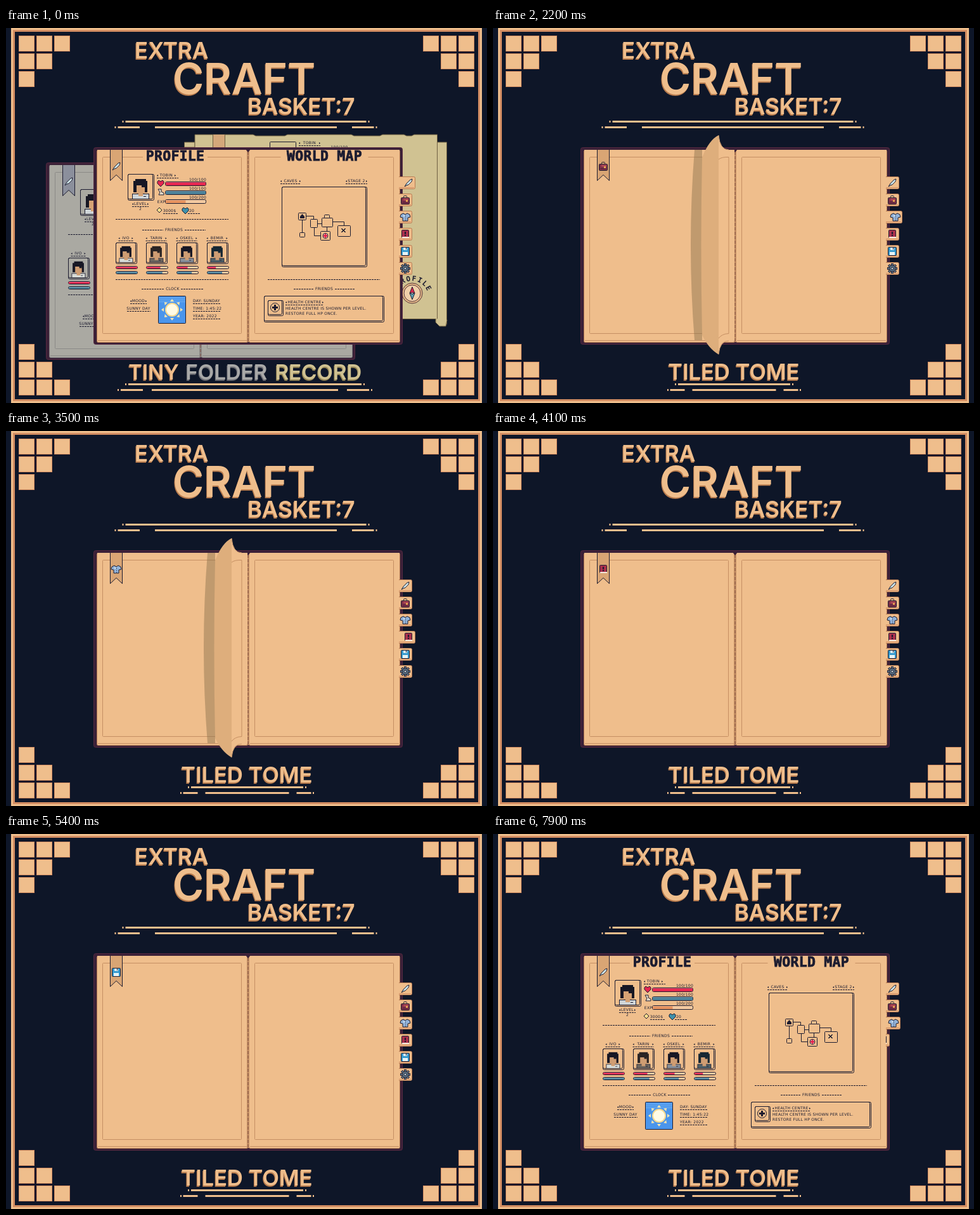
These frames come from a looping animation (759x591 px, 8000 ms). An HTML page with a canvas:

```html
<!DOCTYPE html>
<html lang="en">
<head>
<meta charset="utf-8">
<title>Tiled Tome</title>
<style>
html, body { margin: 0; width: 100%; height: 100%; overflow: hidden; background: #0e1628; }
canvas { display: block; }
</style>
</head>
<body>
<canvas id="stage" width="759" height="591"></canvas>
<script>
const ctx = document.getElementById('stage').getContext('2d');
const NAVY = '#0e1628', PEACH = '#efbe8c', ORANGE = '#d38d62', INK = '#1c1c30';
const RED = '#e5264f', BLUE = '#4b8199', TAN = '#deae7c', KHAKI = '#d0c292';
const WARM = { paper: PEACH, line: '#c58f63', edge: '#a8714f', ribbon: '#d9a574' };
const GREY = { paper: '#aaa9a2', line: '#8b8a87', edge: '#77767a', ribbon: '#8b8f9c' };
const TITLE = 'Inter, sans-serif', MONO = '"DejaVu Sans Mono", monospace';

function rect(color, x, y, w, h) {
  ctx.fillStyle = color;
  ctx.fillRect(x, y, w, h);
}
function box(x, y, w, h, fill, stroke = INK, radius = 1) {
  ctx.beginPath();
  ctx.roundRect(x + .5, y + .5, w - 1, h - 1, radius);
  paint(fill, stroke);
}
// Frame with a heavier right and bottom side
function panel(x, y, w, h) {
  box(x, y, w, h, null, INK, 2);
  box(x, y, w - 2, h - 2, null, INK, 2);
}
function paint(fill, stroke) {
  if (fill) { ctx.fillStyle = fill; ctx.fill(); }
  if (stroke) { ctx.strokeStyle = stroke; ctx.lineWidth = 1; ctx.stroke(); }
}
function path(d, fill, stroke) {
  const p = new Path2D(d);
  if (fill) { ctx.fillStyle = fill; ctx.fill(p); }
  if (stroke) { ctx.strokeStyle = stroke; ctx.lineWidth = 1; ctx.stroke(p); }
}
function circle(x, y, r, fill, stroke) {
  ctx.beginPath();
  ctx.arc(x, y, r, 0, 7);
  paint(fill, stroke);
}
function at(x, y, draw) {
  ctx.save();
  ctx.translate(x, y);
  draw();
  ctx.restore();
}
function dashes(x1, x2, y) {
  ctx.setLineDash([3, 1]);
  path(`M${x1} ${y + .5}H${x2}`, null, INK);
  ctx.setLineDash([]);
}
function text(str, x, y, align = 'center', font = '6px "DejaVu Sans", sans-serif') {
  ctx.font = font;
  ctx.letterSpacing = '0.3px';
  ctx.textAlign = align;
  ctx.textBaseline = 'middle';
  ctx.fillStyle = INK;
  ctx.fillText(str, x, y + .5);
  ctx.letterSpacing = '0px';
}
function pageTitle(str, x, half, theme) {
  rect(theme.paper, x - half, 198, 2 * half, 11);
  text(str, x, 203, 'center', `bold 21.5px ${MONO}`);
  ctx.strokeStyle = INK;
  ctx.lineWidth = .8;
  ctx.letterSpacing = '0.3px';
  ctx.strokeText(str, x, 203.5);
  ctx.letterSpacing = '0px';
}
function label(str, x, y, half) {
  text(str, x, y);
  path(`M${x - half} ${y + .5}l2-1.5v3ZM${x + half} ${y + .5}l-2-1.5v3Z`, INK);
  dashes(x - half, x + half, y + 4);
}
function heading(str, x, y, half, reach) {
  text(str, x, y);
  dashes(x - reach, x - half, y);
  dashes(x + half, x + reach, y);
}

// Decorative frame and lettering
function lettering(str, x, baseline, size, align = 'left', color = PEACH, shade = '#b87b4d') {
  ctx.font = `600 ${size}px ${TITLE}`;
  ctx.textAlign = align;
  ctx.textBaseline = 'alphabetic';
  ctx.fillStyle = shade;
  ctx.fillText(str, x - 1, baseline + 1);
  ctx.fillStyle = color;
  ctx.fillText(str, x, baseline - 1);
}
function rules(center, y, half, gap, inner, tail) {
  const bar = (a, b, top) => rect(PEACH, center + a, top, b - a, 3);
  bar(-half, half, y);
  for (const s of [-1, 1]) {
    rect(PEACH, center + s * (half + 4) - 1, y, 2, 3);
    rect(PEACH, center + s * (half + 16) - 1, y + 9, 2, 3);
    bar(Math.min(s * (inner + gap), s * tail), Math.max(s * (inner + gap), s * tail), y + 9);
  }
  bar(-inner, inner, y + 9);
}
function backdrop() {
  rect(NAVY, 0, 0, 759, 591);
  ctx.lineWidth = 3;
  ctx.strokeStyle = PEACH;
  ctx.strokeRect(9.5, 1.5, 740, 588);
  ctx.strokeStyle = ORANGE;
  ctx.strokeRect(12.5, 4.5, 734, 582);
  for (let row = 0; row < 3; row++)
    for (let col = 0; col < 3 - row; col++)
      for (const x of [20 + 28 * col, 714 - 28 * col])
        for (const y of [12 + 28 * row, 554 - 28 * row]) {
          rect(ORANGE, x, y, 25, 25);
          rect(PEACH, x + 1, y + 1, 23, 23);
        }
  lettering('EXTRA', 203, 49, 35);
  lettering('CRAFT', 263, 105, 67);
  lettering('BASKET:7', 381, 137, 35);
  rules(378.5, 146, 190, 24, 143.5, 202);
}

// Icons, each centred on the origin
const icons = [
  function feather() {
    path('M-6 6L-3 1L3-5L6-6L5-2L0 3L-3 4Z', '#e4f2f2', INK);
    path('M-4 4L4-4', null, '#8fb5c0');
  },
  function backpack() {
    box(-3, -7, 6, 4, null, INK);
    box(-7, -4, 14, 11, '#7d2f48');
    rect('#a64452', -3, -3, 8, 4);
    rect('#e8a052', 1, 0, 3, 3);
    rect('#4a2138', -5, 3, 9, 1);
  },
  function shirt() {
    path('M-3-6L-7-4L-8 0L-4 1V6H4V1L8 0L7-4L3-6L0-4Z', '#92b3d9', INK);
    rect('#d6e5f2', -3, -3, 2, 2);
    for (const y of [-2, 1, 4]) rect(INK, 0, y, 1, 1);
  },
  function book() {
    box(-6, -7, 12, 13, '#a9304c');
    rect('#f2e6dc', -5, 4, 11, 2);
    rect(INK, -1, -4, 2, 4);
    rect(INK, -1, 1, 2, 2);
  },
  function disk() {
    box(-7, -7, 14, 14, '#369ace');
    rect('#d9eef5', -3, -6, 6, 4);
    rect(INK, 1, -6, 1, 3);
    rect('#e7f3f5', -4, 1, 8, 5);
  },
  function gear() {
    for (let i = 0; i < 8; i++) {
      ctx.rotate(Math.PI / 4);
      rect(INK, -2, -8, 4, 5);
      rect('#7890a0', -1, -7, 2, 4);
    }
    circle(0, 0, 5, '#5c7486', INK);
    circle(0, 0, 2, '#c4ced2', INK);
  }
];

function heart(x, y, color) {
  at(x, y, () => path('M0 5L-5 0V-3L-3-5L0-3L3-5L5-3V0Z', color, INK));
}
function bar(x, y, w, h, color, amount) {
  box(x, y, w, h, '#f3c9a0', INK, 2);
  rect(color, x + 1, y + 1, (w - 2) * amount, h - 2);
  rect('#ffffff44', x + 2, y + 1, (w - 4) * amount, 1);
}
function portrait(x, y, size, hair, skin, shirt) {
  panel(x, y, size, size);
  at(x + size / 2 - 1, y + size - 3, () => {
    const s = size / 42;
    ctx.scale(s, s);
    rect(hair, -8, -31, 17, 4);
    rect(hair, -11, -28, 22, 18);
    rect(skin, -6, -21, 13, 13);
    rect(hair, 2, -22, 5, 4);
    rect(INK, -13, -8, 27, 8);
    rect(shirt, -12, -7, 25, 7);
    rect(skin, -3, -9, 7, 5);
    rect(INK, 5, -4, 4, 1);
  });
}

function profilePage(theme) {
  pageTitle('PROFILE', 267, 51, theme);
  portrait(192, 230, 42, '#171724', '#d6a274', '#cfd5d8');
  label('LEVEL', 212, 277, 13);
  text('2', 212, 285);
  label('TOBIN', 253, 232, 15);
  dashes(238, 272, 236);
  heart(244, 245, RED);
  path('M240 254H245V258L249 260V263H241L243 259Z', '#e8ddca', INK);
  text('EXP', 245, 274);
  bar(251, 242, 65, 7, RED, 1);
  bar(251, 256, 65, 7, BLUE, 1);
  bar(251, 270, 65, 7, '#e7935f', .5);
  ['100/100', '100/100', '100/200'].forEach((s, i) => text(s, 316, 239 + 14 * i, 'right'));
  path('M242 283L246 287L242 291L238 287Z', '#ffdc8c', INK);
  text('3000$', 258, 288);
  dashes(248, 271, 292);
  heart(283, 288, '#3f91ab');
  text('20', 293, 288);
  dashes(287, 306, 292);
  dashes(173, 351, 301);
  heading('FRIENDS', 265, 318, 17, 50);
  const friends = [
    ['IVO', '#171724', '#d9ddd9', 1, 1], ['TARIN', '#2a2424', '#6e665f', .65, .75],
    ['OSKEL', '#171724', '#8a919b', .5, .7], ['BEMIR', '#162733', '#4f6068', .4, .7]
  ];
  friends.forEach(([name, hair, shirt, health, energy], i) => {
    const x = 173 + 48 * i;
    label(name, x + 16, 331, name.length * 2.5 + 4);
    portrait(x, 338, 34, hair, '#cf9d73', shirt);
    bar(x, 375, 35, 5, RED, health);
    bar(x, 383, 35, 5, BLUE, energy);
  });
  dashes(173, 351, 396);
  heading('CLOCK', 263, 411, 13, 49);
  label('MOOD', 209, 430, 13);
  text('SUNNY DAY', 209, 442);
  dashes(191, 228, 446);
  box(240, 422, 44, 44, '#4a95ec');
  for (const y of [425, 428, 431]) rect('#6fb0f2', 241, y, 42, 1);
  at(262, 444, () => {
    for (let i = 0; i < 8; i++) {
      ctx.rotate(Math.PI / 4);
      path('M-3-13L0-17L3-13Z', '#fbe7b0');
    }
    circle(0, 0, 11, '#f6d990');
    circle(0, 0, 9, '#fffbe6');
  });
  ['DAY: SUNDAY', 'TIME: 1:45:22', 'YEAR: 2022'].forEach((s, i) => {
    text(s, 295, 430 + 12 * i, 'left');
    dashes(295, 338, 434 + 12 * i);
  });
}

function mapPage(theme) {
  pageTitle('WORLD MAP', 502.5, 69, theme);
  label('CAVES', 449, 241, 16);
  label('STAGE 2', 553, 241, 17);
  panel(435, 250, 135, 127);
  path('M474 296.5H485.5V301M467.5 303V322M492 308.5H498M515 305.5H533.5V311M486.5 314V327.5H496M506.5 313V320', null, INK);
  [[461, 291, 13, 12], [480, 301, 12, 14], [498, 299, 18, 15], [502, 294, 9, 6],
   [523, 311, 21, 18], [496, 320, 16, 15], [463, 322, 9, 8]]
    .forEach(r => box(...r, theme.paper));
  path('M464 297L467.5 293L471 297V300H464Z', INK);
  path('M529 316L535 322M535 316L529 322M530 316L536 322M536 316L530 322', null, INK);
  circle(504, 327.5, 4, '#f5d9c7', INK);
  rect(RED, 503, 324, 2, 7);
  rect(RED, 501, 326, 6, 3);
  dashes(413, 590, 396);
  heading('FRIENDS', 502, 411, 17, 48);
  panel(407, 422, 190, 42);
  panel(413, 429, 25, 25);
  circle(424.5, 440.5, 7, null, INK);
  rect(INK, 423, 436, 3, 9);
  rect(INK, 420, 439, 9, 3);
  label('HEALTH CENTRE', 471, 432, 30);
  text('HEALTH CENTRE IS SHOWN PER LEVEL.', 441, 442, 'left');
  text('RESTORE FULL HP ONCE.', 441, 450, 'left');
}

function bookmark(theme, icon, length = 1) {
  ctx.save();
  ctx.beginPath();
  ctx.rect(160, 192, 30, 50);
  ctx.clip();
  ctx.translate(0, -50 * (1 - length));
  path('M164.5 191V240.5L174 231.5L183.5 240.5V191Z', theme.ribbon, INK);
  at(174, 218, icons[icon]);
  ctx.restore();
}
function book(theme) {
  box(138, 188, 488, 311, '#3a2037', '#562840', 3);
  for (const x of [143, 383]) {
    box(x, 192, 239, 304, theme.paper, theme.edge, 2);
    rect(theme.paper, x + 1, 192, 237, 2);
    rect(theme.line, x + 2, 492, 235, 1);
    box(x + 9, 203, 220, 279, null, theme.line);
  }
  rect(theme.line, 380, 194, 4, 301);
  ctx.setLineDash([5, 2]);
  path('M382 195V495', null, '#805044');
  ctx.setLineDash([]);
  path('M378 191H386L382 196Z', '#3a2037');
}
function profileSpread(theme) {
  book(theme);
  profilePage(theme);
  mapPage(theme);
  bookmark(theme, 0);
}
function tabs(offsetOf) {
  ctx.save();
  ctx.beginPath();
  ctx.rect(620, 225, 60, 170);
  ctx.clip();
  icons.forEach((icon, i) => {
    const dx = offsetOf(i);
    if (dx === null) return;
    const y = 244 + 27 * i;
    box(610, y - 10, 31 + dx, 20, PEACH, '#b77b52', 2);
    rect(ORANGE, 620, y + 7, 19 + dx, 1);
    at(630 + dx, y, icon);
  });
  ctx.restore();
}

// Turning page: it rises from the spine to a ridge, its back falls to the free edge
function turningPage(ridge, free, rise) {
  const top = 192 - rise, bottom = 493 + rise * .93;
  path(`M${free} 192H${free - 12}Q${free - 24} 342 ${free - 12} 492H${free}Z`, '#8a6f4c77');
  path(`M${ridge} ${top}Q${ridge + 2} 192 ${ridge + 16} 192H381V493H${ridge + 16}Q${ridge + 2} 493 ${ridge} ${bottom}Z`, PEACH);
  path(`M${ridge} ${top}Q${ridge + 2} 192 ${ridge + 16} 192M${ridge + 16} 493Q${ridge + 2} 493 ${ridge} ${bottom}`, null, '#c9986b');
  path(`M${ridge} 207Q${ridge + 5} 203 372 203.5V481.5Q${ridge + 5} 482 ${ridge} 489`, null, WARM.line);
  path(`M${ridge} ${top}Q${free + 11} ${top + 7} ${free} 204Q${free - 3} 342 ${free} 484Q${free + 11} ${bottom - 8} ${ridge} ${bottom}Z`, TAN);
}
function cornerCurl() {
  path('M145 426Q142 490 204 492H190Q158 492 145 462Z', '#b9935f');
  path('M145 409Q155 441 192 438Q194 482 237 492Q194 493 172 483Q147 468 145 409Z', TAN);
  path('M145 409Q155 441 192 438Q194 482 237 492', null, '#d3a474');
}
function pageTurn(step) {
  if (step === 1) at(764, 0, () => { ctx.scale(-1, 1); cornerCurl(); });
  if (step === 2) turningPage(452, 410, 20);
  if (step === 3) turningPage(356, 330, 23);
  if (step === 4) turningPage(266, 224, 20);
  if (step === 5) turningPage(190, 160, 9);
  if (step === 6) cornerCurl();
}

// Opening composition: parchment, grey book and main book
function parchment() {
  const edge = '#6f6042';
  path('M281.5 188V180H298V188Z', KHAKI, edge);
  path('M660 180H695.5V467L690 470L680 464V458H660Z', KHAKI, edge);
  path('M298 200V168H390L394 170H440L444 168H545L549 170H590L594 168H628L632 170H640L644 168H680.5V458.5H600V200Z', KHAKI, edge);
  path('M678 458V464L684 470H694L696 460', KHAKI, edge);
  rect('#d4a77a', 327, 168, 18, 22);
  path('M326.5 168V190M345.5 168V190', null, edge);
  box(416, 179, 42, 20, null);
  label('TOBIN', 479, 181, 17);
  text('100/100', 526, 188);
  circle(641, 418, 16, '#e8bd8b', '#533137');
  circle(641, 418, 13, '#f0cfaa', '#533137');
  path('M641 408L645 418H637Z', RED, INK);
  path('M641 428L645 418H637Z', '#5e9fb0', INK);
  circle(641, 418, 1.5, '#f4eee0', INK);
  [...'PROFILE'].forEach((ch, i) => at(641, 424, () => {
    ctx.rotate(-.85 + .32 * i);
    text(ch, 0, -29, 'center', `bold 11px ${MONO}`);
  }));
}
function opening() {
  parchment();
  at(-75, 24, () => profileSpread(GREY));
  profileSpread(WARM);
  tabs(i => i === 0 ? 5 : 0);
  lettering('TINY', 233, 555, 33, 'center');
  lettering('FOLDER', 348, 555, 33, 'center', '#a9a9a8', '#6d6d73');
  lettering('RECORD', 493, 555, 33, 'center', KHAKI, '#958555');
  rules(377, 560, 184, 14, 147, 196);
}

function turning(t) {
  const turn = Math.floor((t - 700) / 1300);
  const step = Math.floor((t - 700 - 1300 * turn) / 100) + 1;
  book(WARM);
  if (step < 6) bookmark(WARM, turn);
  if (step > 7) bookmark(WARM, turn + 1, step === 8 ? .5 : 1);
  pageTurn(step);
  tabs(i => i === turn + 1 && step < 9 ? 5 : 0);
}
function poppingTab(t, i) {
  const age = Math.floor((t - 7300 - 200 * i) / 100);
  return age < 0 ? null : [-15, 8, 2][age] ?? 0;
}

function draw(t) {
  backdrop();
  if (t < 500) return opening();
  if (t >= 700 && t < 7200) turning(t);
  else {
    profileSpread(WARM);
    tabs(i => t < 700 ? 0 : poppingTab(t, i));
  }
  lettering('TILED TOME', 380, 555, 34.5, 'center');
  rules(380.5, 560, 88.5, 12, 66, 101);
}

const start = performance.now();
function tick() {
  draw((performance.now() - start) % 8000);
  requestAnimationFrame(tick);
}
tick();
</script>
</body>
</html>
```
